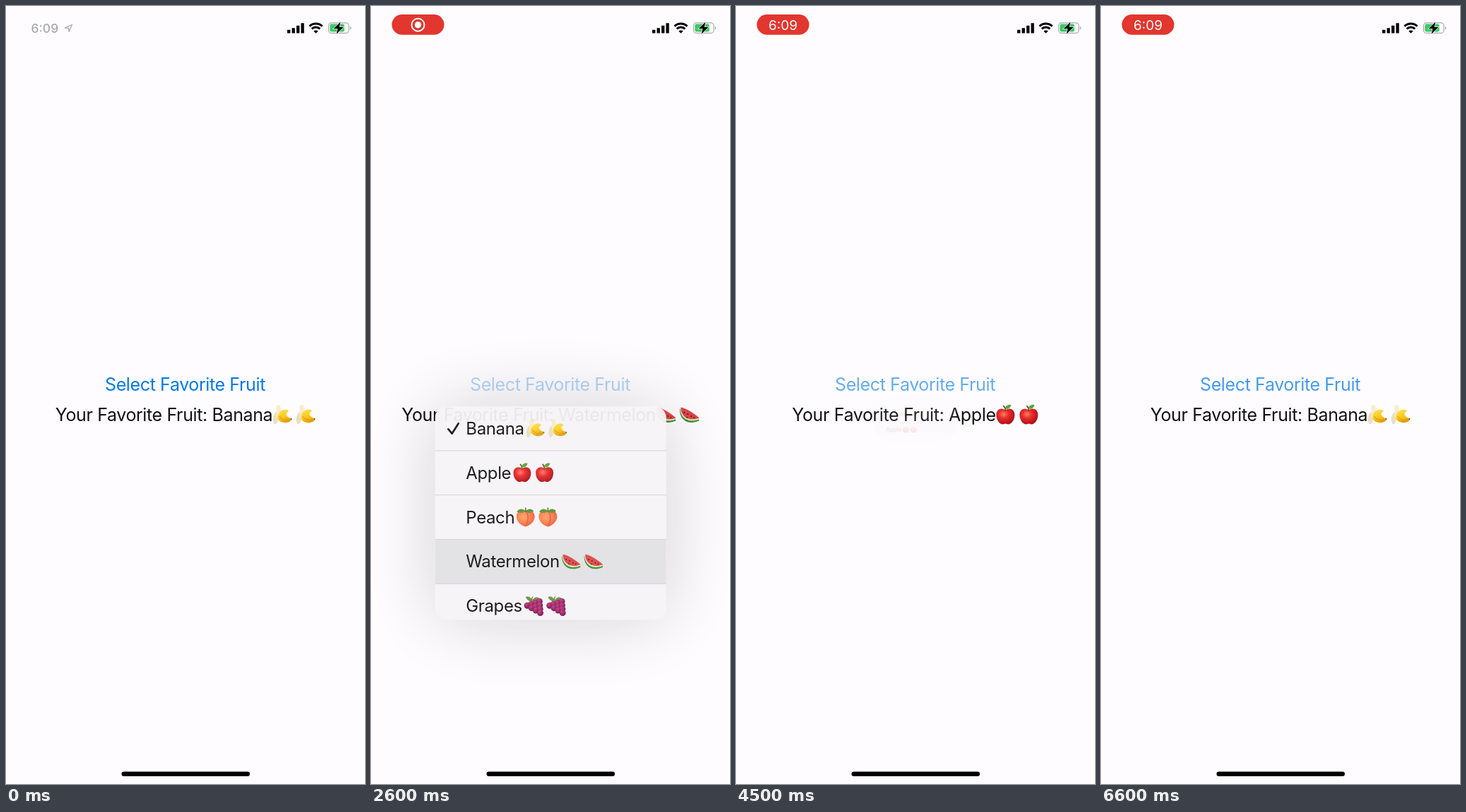
Write an HTML page that moves like this. It is 508 px wide and 1102 px high and loops after 6.7 s.

```html
<!DOCTYPE html>
<html lang="en">
<head>
<meta charset="utf-8">
<title>Favorite fruit menu</title>
<style>
  html, body { margin: 0; width: 100%; height: 100%; overflow: hidden; background: #fefcff; }
  svg { display: block; width: 100%; height: 100%; }
  text { font: 25px Inter, Roboto, sans-serif; letter-spacing: -.015em; fill: #111; white-space: pre; }
  .clock { letter-spacing: 0; }
</style>
</head>
<body>
<svg viewBox="0 0 508 1102">
  <defs>
    <radialGradient id="red" cx=".4" cy=".35" r=".7">
      <stop offset="0" stop-color="#ff7a66"/><stop offset=".4" stop-color="#e82a2a"/><stop offset="1" stop-color="#a80e18"/>
    </radialGradient>
    <radialGradient id="orange" cx=".4" cy=".4" r=".7">
      <stop offset="0" stop-color="#ffa468"/><stop offset=".55" stop-color="#fa7b48"/><stop offset="1" stop-color="#e4553c"/>
    </radialGradient>
    <linearGradient id="yellow" x2=".4" y2="1">
      <stop offset="0" stop-color="#ffe45a"/><stop offset=".6" stop-color="#fccb1c"/><stop offset="1" stop-color="#e59f10"/>
    </linearGradient>
    <radialGradient id="purple" cx=".4" cy=".3" r=".7">
      <stop offset="0" stop-color="#c23f80"/><stop offset=".6" stop-color="#951f60"/><stop offset="1" stop-color="#651244"/>
    </radialGradient>

    <g id="Banana">
      <path d="M-9-4C-14 2-14 9-11 13.500C-7 14-6 7-4 2Z" fill="#eadfc0"/>
      <path d="M-8.500-11C-7.500-15-3-15-2.500-11L0 3L-8 4Z" fill="#f8ecca"/>
      <path d="M-6 0C-3-6 3-9 8-6.500C10-5 8-4 6-3C5 1 8 4 13 5C14 9 8 12 2 11C-4 10-8 6-6 0Z" fill="url(#yellow)"/>
      <path d="M-4 2C-1 7 5 9 12 6.500" fill="none" stroke="#d99a12" stroke-width="1.100"/>
      <path d="M12 4.500L14 5.500L12.500 8Z" fill="#6b5520"/>
    </g>
    <g id="Apple">
      <path d="M0-6C5-11 13-8 13 0C13 8 8 13.500 4 13.500C2 13.500 1 12.500 0 12.500S-2 13.500-4 13.500C-8 13.500-13 8-13 0C-13-8-5-11 0-6Z" fill="url(#red)"/>
      <path d="M0-5C0-9-1-11-3-13" fill="none" stroke="#67401f" stroke-width="1.600"/>
      <path d="M-1-8C0-13 4-15 8-14C7-9 3-8-1-8Z" fill="#55a630"/>
    </g>
    <g id="Peach">
      <path d="M0-9C8-13 14-7 13.500 0C13 7 6 13 0 14C-6 13-13 7-13.500 0C-14-7-8-13 0-9Z" fill="url(#orange)"/>
      <path d="M1-8C5-2 4 7 0 13" fill="none" stroke="#d9583a" stroke-width="1.300"/>
      <path d="M0-9C-5-14-10-12-13-8C-8-6-4-6 0-9C4-5 9-6 12-9C9-13 4-13 0-9Z" fill="#5c9435"/>
      <path d="M0-8V-14" stroke="#77512b" stroke-width="1.500"/>
    </g>
    <g id="Watermelon">
      <path d="M-13.500-8C-14 5-4 16 14 8.500L13.500 4Z" fill="#3f8b3c"/>
      <path d="M-13-9C-13 3-3 13 14 6.500L13.500 4Z" fill="#dceab0"/>
      <path d="M-12-10.500C-12 1-3 10.500 14 4.500C8-1-3-9-12-10.500Z" fill="#e04449"/>
      <path d="M-7-4V-2M-2-2V0M-3 3V4.500M3 1V3M7 3V4.500" stroke="#4a1a1c" stroke-width="1.500"/>
    </g>
    <g id="Grapes"></g>

    <clipPath id="clip"><rect id="clipBox" x="-170.500" width="341" rx="17"/></clipPath>
    <filter id="blur" filterUnits="userSpaceOnUse" x="-370" y="-200" width="740" height="740">
      <feGaussianBlur stdDeviation="58"/>
    </filter>
  </defs>

  <rect width="508" height="1102" fill="#fefcff"/>
  <rect x="505" width="3" height="1102" fill="#fff"/>

  <g id="idleClock">
    <text class="clock" x="35.500" y="37.500" style="font-size:17.500px;font-weight:500;fill:#aaa">6:09</text>
    <path d="M83.500 31L93.500 26.500L89 36.300L88.500 31.300Z" fill="none" stroke="#aaa" stroke-width="1.300" stroke-linejoin="round"/>
  </g>
  <g id="pill">
    <rect id="pillBox" x="29.500" y="12" width="74" height="28.800" rx="14.400"/>
    <g id="record">
      <circle cx="66.500" cy="26.700" r="9" fill="none" stroke="#fff" stroke-width="2"/>
      <circle cx="66.500" cy="26.700" r="4.700" fill="#fff"/>
    </g>
    <text id="pillClock" class="clock" x="66.500" y="33.500" text-anchor="middle" style="font-size:19px;fill:#fff">6:09</text>
  </g>

  <path d="M400.200 33.800V38.600M406.700 31.200V38.600M413.200 27.800V38.600M419.600 24.200V38.600" stroke="#000" stroke-width="4.300"/>
  <g fill="none" stroke="#000" stroke-width="3">
    <path d="M429.500 28.800C434.500 23.800 442.500 23.800 447.500 28.800M432.700 32.400C436 29.200 441 29.200 444.300 32.400"/>
    <path d="M438.500 38.800L435.300 35.600C437.200 34 439.800 34 441.700 35.600Z" fill="#000" stroke="none"/>
  </g>
  <rect x="456.500" y="23.800" width="28.500" height="14.600" rx="4" fill="#fff" stroke="#aaa" stroke-width="1.200"/>
  <path d="M486.800 29V33.500C489 32.800 489 29.700 486.800 29Z" fill="#aaa"/>
  <rect x="458.300" y="25.600" width="20.500" height="11" rx="2.400" fill="#3fc868"/>
  <path d="M473.500 22.500L463.500 32.300H469.500L467.500 39.800L477.700 29.700H471.500Z" fill="#000" stroke="#fff" stroke-width="1.200" paint-order="stroke"/>
  <rect x="163.500" y="1084.500" width="181.500" height="6.600" rx="3.300" fill="#000"/>

  <text id="link" x="140" y="545" style="fill:#007aea">Select Favorite Fruit</text>
  <g id="label"></g>

  <g id="menu">
    <rect id="shadow" x="-170.500" width="341" rx="17" fill="#000" opacity=".18" filter="url(#blur)"/>
    <g clip-path="url(#clip)">
      <rect x="-171" width="342" height="330" fill="#f6f4f7"/>
      <rect id="hot" x="-170.500" width="341" height="65.500" fill="#e2e1e4"/>
      <g id="rows"></g>
      <path id="check" d="M-151 1L-145.500 7.500L-136-7.500" fill="none" stroke="#111" stroke-width="2.800" stroke-linecap="round" stroke-linejoin="round"/>
    </g>
  </g>
</svg>
<script>
const $ = id => document.getElementById(id);
const LOOP = 6700, STEP = 100;
const ROW = 65.5, FULL = 329, MIN = 0.2, PITCH = 33, PREFIX = 220;

// offset: distance from the start of the word to its first emoji centre
const fruits = [
  { name: 'Banana', offset: 101 },
  { name: 'Apple', offset: 82 },
  { name: 'Peach', offset: 87 },
  { name: 'Watermelon', offset: 154 },
  { name: 'Grapes', offset: 99 }
];
const sessions = [
  { open: 1330, pick: 2582, from: 0, to: 3 },
  { open: 3470, pick: 4340, from: 3, to: 1 },
  { open: 5080, pick: 6380, from: 1, to: 0 }
];

const clamp = v => Math.max(0, Math.min(1, v));
const ramp = (t, a, b) => clamp((t - a) / (b - a));
const settle = x => 1 - (1 + x) * Math.exp(-x);
const set = (el, attrs) => { for (const k in attrs) el.setAttribute(k, attrs[k]); };

function pair(name, x, y) {
  return [0, PITCH].map(d => `<use href="#${name}" x="${x + d}" y="${y}"/>`).join('');
}

function buildGrapes() {
  let art = '<path d="M-3-4C-4-9-3-12-1-14M-3-7C-9-8-11-11-11-13C-6-14-3-11-3-7ZM-2-8C1-13 5-13 8-11C6-8 2-6-2-8Z" fill="#6b9a3c" stroke="#5b8230"/>';
  for (let j = 0; j < 4; j++)
    for (let i = 0; i + j < 4; i++)
      art += `<circle cx="${-9.5 + 6 * i + 6.4 * j}" cy="${-0.5 - 2 * i + 3.6 * j}" r="4.700" fill="url(#purple)"/>`;
  $('Grapes').innerHTML = art;
}

function buildRows() {
  $('rows').innerHTML = fruits.map((f, i) => {
    const mid = ROW * (i + 0.5);
    const line = i ? `<path d="M-171 ${ROW * i}H171" stroke="#d3d2d5"/>` : '';
    return line + `<text x="-125" y="${mid + 9}">${f.name}</text>` + pair(f.name, f.offset - 124, mid);
  }).join('');
}

let shown = -1;
function showLabel(i) {
  if (i === shown) return;
  shown = i;
  const { name, offset } = fruits[i];
  const x = 253.3 - (PREFIX + offset + PITCH + 13) / 2;
  $('label').innerHTML = `<text x="${x}" y="588">Your Favorite Fruit: ${name}</text>` + pair(name, x + PREFIX + offset, 579);
}

function drawStatus(t) {
  set($('idleClock'), { opacity: 1 - ramp(t, 0, 200) });
  set($('pill'), { opacity: ramp(t, 100, 400) });
  const swap = ramp(t, 2900, 3200);
  set($('record'), { opacity: 1 - swap });
  set($('pillClock'), { opacity: swap });
  const glow = ((1 + Math.cos((t - 3600) * Math.PI / 1000)) / 2) ** 3;
  set($('pillBox'), { fill: `rgb(${226 + 29 * glow},${54 + 5 * glow},${46 + 2 * glow})` });
}

function drawMenu(t) {
  const now = sessions.filter(s => s.open <= t).pop();
  let size = 0, linkAlpha = 1;
  if (now) {
    const closing = t - now.pick;
    if (closing < 0) {
      const age = t - now.open;
      size = settle(age * 0.027);
      linkAlpha = 0.3 + 0.7 * Math.exp(-(age + 80) / 60);
    } else {
      size = 1 - settle(closing * 0.02);
      linkAlpha = 0.26 + 0.74 * clamp(closing / 340);
    }
    set($('check'), { transform: `translate(0 ${ROW * (now.from + 0.5)})` });
    set($('hot'), { y: ROW * now.to, opacity: closing > -100 ? 1 : 0 });
  }
  showLabel(now ? (t < now.pick ? now.from : now.to) : 0);
  set($('link'), { opacity: linkAlpha });

  const scale = MIN + (1 - MIN) * size;
  const alpha = now ? clamp((scale - 0.27) / 0.73) : 0;
  set($('menu'), {
    transform: `translate(254.200 567) scale(${scale})`,
    opacity: alpha,
    visibility: alpha ? 'visible' : 'hidden'
  });
  for (const id of ['clipBox', 'shadow']) set($(id), { height: FULL * scale });
}

function draw(ms) {
  const t = Math.floor(ms % LOOP / STEP) * STEP;
  drawStatus(t);
  drawMenu(t);
}

buildGrapes();
buildRows();
draw(0);
const start = performance.now();
(function tick() {
  draw(performance.now() - start);
  requestAnimationFrame(tick);
})();
</script>
</body>
</html>
```
